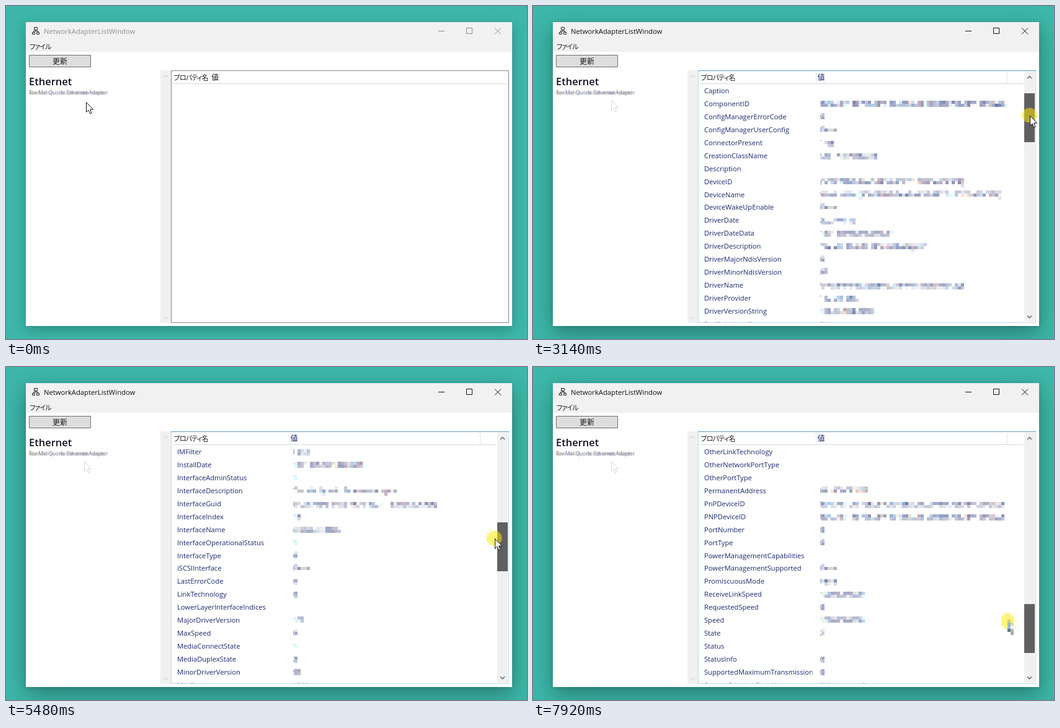
Write an HTML page with a canvas that moves like this. It is 840 px wide and 538 px high and loops after 7.99 s.

```html
<!DOCTYPE html>
<html lang="ja">
<head>
<meta charset="utf-8">
<style>
  html, body { margin: 0; width: 100%; height: 100%; overflow: hidden; background: #3cb7a9; }
  #win { position: absolute; left: 32px; top: 26px; width: 784px; height: 491px; background: #fff;
         box-shadow: 0 6px 20px rgba(0,0,0,.24); }
  #win.active { box-shadow: 0 12px 34px rgba(0,0,0,.32), 0 1px 6px rgba(0,0,0,.12); }
  svg, canvas { position: absolute; left: 0; top: 0; }
  text { font: 11.15px "Open Sans", "Noto Sans", sans-serif; fill: #1b2a6b; }
  .jp { font: 11px "Noto Sans CJK JP", "Noto Sans CJK", sans-serif; fill: #1b1b1b;
        font-feature-settings: "palt"; letter-spacing: -.8px; }
  .jp.wide { font-size: 12px; letter-spacing: 0; }
  .line { fill: none; stroke-width: 1; }
</style>
</head>
<body>
<div id="win"></div>
<svg width="840" height="538" viewBox="0 0 840 538">
  <defs><clipPath id="nameClip"><path d="M270 126H450.5V510.5H270Z"/></clipPath></defs>
  <path fill="#f1f1f1" d="M32 26H816V74H32Z"/>
  <g class="line" stroke="#222">
    <path d="M45.5 34.5h5v4h-5zM42.5 42.5h4v3h-4zM49.5 42.5h4v3h-4zM48 38.5v2M44.5 42v-1.5h7V42"/>
  </g>
  <text id="title" x="61" y="45" style="font-size:11.25px">NetworkAdapterListWindow</text>
  <path id="buttons" class="line" d="M697 40.5h10M742.5 35.5h9v9h-9zM788 35.5l10 10M798 35.5l-10 10"/>
  <text class="jp" x="38" y="69.5">ファイル</text>
  <path fill="#ddd" stroke="#706c6c" d="M37.5 79.5H136.5V98.5H37.5Z"/>
  <text class="jp wide" x="87" y="93.5" text-anchor="middle">更新</text>

  <path id="hover" fill="#dedede" d="M33 105H248V149H33Z"/>
  <text x="37" y="128" style="font-size:16.5px;font-weight:600;fill:#0e1020">Ethernet</text>
  <text x="37" y="143" style="font-size:8.3px;fill:#6c6c7c">Tov Mel Quorlo Ethernet Adapter</text>
  <g id="blur"></g>
  <path fill="#f0f0f0" d="M249 104H266V512H249Z"/>
  <path class="line" stroke="#c4c4c4" d="M254 115.500l3.500-3.500 3.500 3.500M254 502l3.500 3.500 3.500-3.500"/>

  <path id="box" class="line" d="M266.500 104.500H810.500V511.500H266.500Z"/>
  <path id="boxTop" class="line" d="M266 104.500H811"/>
  <text class="jp" x="270.500" y="119.500">プロパティ名</text>
  <text class="jp wide" id="valueHead" y="120">値</text>
  <g id="names" clip-path="url(#nameClip)"></g>
</svg>
<canvas id="stage" width="840" height="538"></canvas>

<script>
const LOOP = 7990, ACTIVATE = 870, RELEASE = 970, LOADED = 1160, PRESS = 2550;
const ROWS = 19, CELL = 5;
const AREA = { x: 465, y: 128, w: 320, h: 375 };   // pixelated part of the value column
const FONT = '11.15px "Open Sans", "Noto Sans", sans-serif';

const GUID = '{5C0E71D2-94AB-4F36-8E27-1B7D3A60C95F}';
const BUS = 'BUS\\NET_4C7E&DEV_1042&SUB_00031C7E&REV_01\\3&26';
const CARD = 'Tov Mel Quorlo Ethernet Adapter';
const rows = `ActiveMaximumTransmissionUnit 1500
AdminLocked False
AutoSense False
Availability 5
Caption
ComponentID ${BUS}
ConfigManagerErrorCode 0
ConfigManagerUserConfig False
ConnectorPresent True
CreationClassName SYS_ NetPortCard
Description
DeviceID ${GUID}
DeviceName \\Device\\Net${GUID}
DeviceWakeUpEnable False
DriverDate 2023-01-16
DriverDateData 133183008000000000
DriverDescription ${CARD}
DriverMajorNdisVersion 6
DriverMinorNdisVersion 85
DriverName \\SystemRoot\\System32\\drivers\\nqcard64.sys
DriverProvider Tov Mel Ltd.
DriverVersionString 100.93.104.2290
EndPointInterface False
ErrorCleared False
ErrorDescription
FullDuplex True
HardwareInterface True
Hidden False
HigherLayerInterfaceIndices {14}
IMFilter False
InstallDate 133190526418273645
InterfaceAdminStatus 1
InterfaceDescription ${CARD}
InterfaceGuid ${GUID}
InterfaceIndex 14
InterfaceName ethernet_3276
InterfaceOperationalStatus 1
InterfaceType 6
iSCSIInterface False
LastErrorCode 0
LinkTechnology 0
LowerLayerInterfaceIndices
MajorDriverVersion 100
MaxSpeed 0
MediaConnectState 1
MediaDuplexState 2
MinorDriverVersion 93
MtuSize 1500
Name Ethernet
NdisMedium 0
NdisPhysicalMedium 0
NetLuid 1689399632855040
NetLuidIndex 32768
NetworkAddresses {0A1B00C81E07}
NotUserRemovable False
OperationalStatusDownDefaultPortNotAuthenticated False
OperationalStatusDownInterfacePaused False
OperationalStatusDownLowPowerState False
OperationalStatusDownMediaDisconnected False
OtherLinkTechnology
OtherNetworkPortType
OtherPortType
PermanentAddress 0A1B00C81E07
PnPDeviceID ${BUS}
PNPDeviceID ${BUS}
PortNumber 0
PortType 0
PowerManagementCapabilities
PowerManagementSupported False
PromiscuousMode False
ReceiveLinkSpeed 10000000000
RequestedSpeed 0
Speed 10000000000
State 2
Status
StatusInfo 0
SupportedMaximumTransmissionUnit 0
SystemCreationClassName SYS_NetworkPort`.split('\n').map(line => {
  const cut = line.indexOf(' ');
  return cut < 0 ? [line, ''] : [line.slice(0, cut), line.slice(cut + 1)];
});

// time, pointer x, pointer y, first visible row
const track = [
  [0, 129, 155, 0], [80, 129, 155, 0], [470, 120, 134, 0], [1540, 120, 134, 0],
  [1810, 330, 140, 0], [2040, 560, 146, 0], [2400, 801, 151, 0], [2700, 801, 151, 0],
  [3140, 801, 177, 4], [3350, 799, 186, 8], [3630, 799, 186, 8], [3960, 793, 213, 14],
  [4160, 792, 226, 17], [4550, 792, 226, 17], [5480, 788, 277, 29], [6360, 785, 328, 40],
  [7230, 776, 388, 54], [7640, 776, 388, 54], [7920, 766, 411, 59], [LOOP, 766, 411, 59]
];

const $ = id => document.getElementById(id);
const svgEl = (tag, attrs, parent) => {
  const el = document.createElementNS('http://www.w3.org/2000/svg', tag);
  for (const k in attrs) el.setAttribute(k, attrs[k]);
  return parent.appendChild(el);
};
const baseline = i => 141 + Math.round(20.94 * i);
const ctx = $('stage').getContext('2d');
const buffer = document.createElement('canvas');
buffer.width = AREA.w * 3;
buffer.height = AREA.h;
const sub = buffer.getContext('2d', { willReadFrequently: true });
const arrow = new Path2D('M.5.5V16.500L4 13.200 6.500 19 9 17.900 6.500 12.200H11.500Z');
const names = Array.from({ length: ROWS }, (_, i) => svgEl('text', { x: 276, y: baseline(i) }, $('names')));

// soft pixel blocks over the adapter line
let seed = 7;
const rand = () => (seed = seed * 16807 % 2147483647) / 2147483647;
for (let x = 37; x < 164; x += 4) {
  if (rand() < .75) svgEl('rect', { x, y: 138, width: 4, height: 5,
    fill: `hsl(${rand() < .7 ? 222 : 28} 20% ${52 + rand() * 28}%)`, opacity: .45 }, $('blur'));
}

function poseAt(t) {
  let i = 1;
  while (i < track.length - 1 && track[i][0] < t) i++;
  const a = track[i - 1], b = track[i];
  const k = Math.min(1, Math.max(0, (t - a[0]) / (b[0] - a[0])));
  const mix = n => a[n] + (b[n] - a[n]) * k;
  return { x: Math.round(mix(1)), y: Math.round(mix(2)), first: Math.round(mix(3)) };
}

function drawValues(c, first) {
  c.font = FONT;
  c.fillStyle = '#1b2a6b';
  for (let i = 0; i < ROWS; i++) {
    const row = rows[first + i];
    if (row) c.fillText(row[1], 462.5, baseline(i));
  }
}

function drawPointer(c, x, y, down) {
  c.save();
  c.translate(x, y);
  if (down) {
    c.fillStyle = 'rgba(255,232,0,.53)';
    c.beginPath();
    c.arc(-.5, -.5, 12, 0, 7);
    c.fill();
  }
  c.fillStyle = '#fff';
  c.strokeStyle = '#111';
  c.fill(arrow);
  c.stroke(arrow);
  c.restore();
}

// averages the middle of each cell in a triple-width rendering, one shifted window per colour stripe
function cellColor(data, x, y) {
  return [0, 1, 2].map(ch => {
    let sum = 0;
    for (let dy = 1; dy < 4; dy++) {
      for (let dx = -3; dx < 4; dx++) {
        sum += data[((y + dy) * buffer.width + x * 3 + 6 + ch + dx) * 4 + ch];
      }
    }
    return Math.round(sum / 21);
  });
}

function drawMosaic(first, p, down) {
  sub.setTransform(3, 0, 0, 1, -AREA.x * 3, -AREA.y);
  sub.fillStyle = '#fff';
  sub.fillRect(AREA.x, AREA.y, AREA.w, AREA.h);
  drawValues(sub, first);
  drawPointer(sub, p.x, p.y, down);
  const data = sub.getImageData(0, 0, buffer.width, AREA.h).data;
  ctx.fillStyle = '#fff';
  ctx.fillRect(AREA.x, AREA.y, AREA.w, AREA.h);
  for (let y = 0; y < AREA.h; y += CELL) {
    for (let x = 0; x < AREA.w; x += CELL) {
      const rgb = cellColor(data, x, y);
      if (Math.min(...rgb) > 240) continue;
      ctx.fillStyle = `rgb(${rgb})`;
      ctx.fillRect(AREA.x + x, AREA.y + y, CELL, CELL);
    }
  }
}

function stroke(color, points, width = 1) {
  ctx.strokeStyle = color;
  ctx.lineWidth = width;
  ctx.beginPath();
  points.forEach(([x, y], i) => i ? ctx.lineTo(x, y) : ctx.moveTo(x, y));
  ctx.stroke();
}

function drawScrollbar(first, t, p) {
  ctx.fillStyle = '#f0f0f0';
  ctx.fillRect(792, 106, 17, 404);
  ctx.fillStyle = t >= PRESS ? '#606060' : p.x > 791 ? '#a6a6a6' : '#cdcdcd';
  ctx.fillRect(792, 123 + Math.round(4.405 * first), 17, 79);
  stroke('#505050', [[797, 117], [800.5, 113.5], [804, 117]], 1.2);
  stroke('#505050', [[797, 500.5], [800.5, 504], [804, 500.5]], 1.2);
}

let shown = -2;
function showNames(first) {
  if (first === shown) return;
  shown = first;
  names.forEach((el, i) => el.textContent = first < 0 ? '' : (rows[first + i] || [''])[0]);
}

function render(t) {
  const p = poseAt(t), active = t >= ACTIVATE, loaded = t >= LOADED;
  const down = t >= PRESS || (t >= ACTIVATE && t < RELEASE);
  const overList = p.x > 266;

  $('win').className = active ? 'active' : '';
  $('title').style.fill = active ? '#111' : '#8f8f8f';
  $('buttons').setAttribute('stroke', active ? '#111' : '#8a8a8a');
  $('hover').style.display = p.x < 248 && p.y < 149 ? '' : 'none';
  $('box').setAttribute('stroke', overList ? '#bcd9e8' : '#84878d');
  $('boxTop').setAttribute('stroke', overList ? '#5a9cc4' : '#84878d');
  $('valueHead').setAttribute('x', loaded ? 458.5 : 331);
  $('valueHead').style.fill = loaded ? '#1b2a6b' : '#1b1b1b';
  showNames(loaded ? p.first : -1);

  ctx.clearRect(0, 0, 840, 538);
  stroke('#cfd8df', [[270, 125.5], [loaded ? 790 : 807, 125.5]]);
  for (const x of loaded ? [456.5, 764.5] : [328.5, 344.5]) stroke('#dfe5ea', [[x, 107], [x, 125]]);

  if (t > 300) {
    ctx.globalAlpha = .16;
    drawPointer(ctx, 126, 152, false);
    ctx.globalAlpha = 1;
  }
  if (loaded) {
    ctx.save();
    ctx.beginPath();
    ctx.rect(458, 126, 332, 384.5);
    ctx.clip();
    ctx.globalAlpha = .6;
    drawValues(ctx, p.first);
    ctx.restore();
    drawScrollbar(p.first, t, p);
  }
  ctx.lineWidth = 1;
  drawPointer(ctx, p.x, p.y, down);
  if (loaded) drawMosaic(p.first, p, down);
}

const start = performance.now();
function tick() {
  render((performance.now() - start) % LOOP);
  requestAnimationFrame(tick);
}
render(0);
requestAnimationFrame(tick);
</script>
</body>
</html>
```
